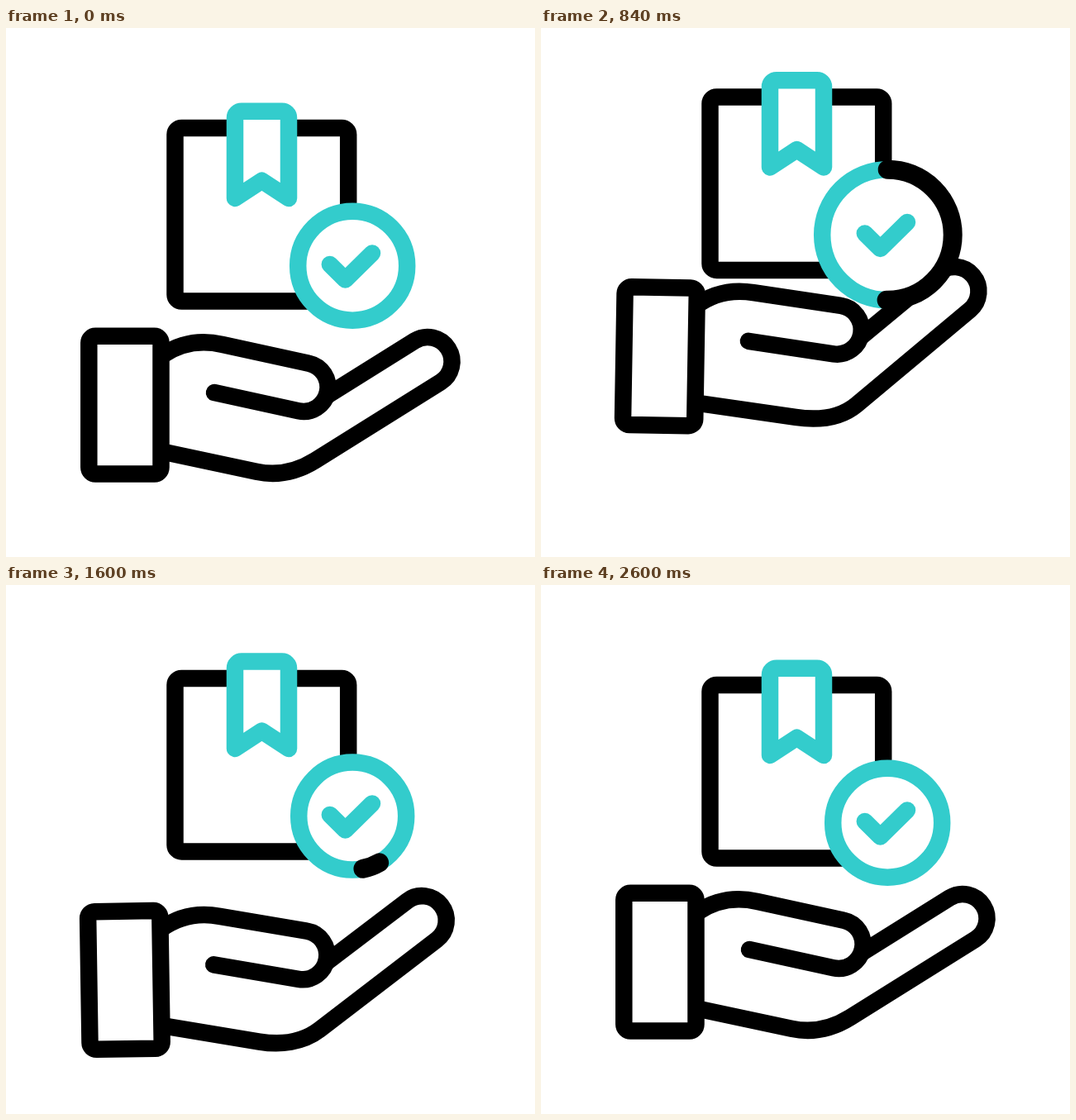
Recreate the animation shown at these times as an HTML page with a canvas. Size 640x640 px, loop 3000 ms.

```html
<!DOCTYPE html>
<html lang="en">
<head>
<meta charset="utf-8">
<title>Parcel in hand</title>
<style>
  html, body { margin: 0; width: 100%; height: 100%; overflow: hidden; background: #fff; }
  canvas { display: block; width: 640px; height: 640px; }
</style>
</head>
<body>
<canvas id="stage" width="640" height="640"></canvas>
<script>
const ctx = document.getElementById('stage').getContext('2d');
const LOOP = 3000, STEP = 40;
const BLACK = '#000', TEAL = '#33cccc', WHITE = '#fff';
const LINE = 20.5, RAD = Math.PI / 180;
const WRIST = [188, 456];
const BADGE = [419.2, 287.7];

const sine = u => (1 - Math.cos(Math.PI * u)) / 2;
const quadOut = u => 1 - (1 - u) ** 2;
const linear = u => u;

// Share of a change that has happened by time t; changes add up to a motion
function move(t, start, end, change, ease = sine) {
  const u = Math.min(1, Math.max(0, (t - start) / (end - start)));
  return change * ease(u);
}

// Dip, throw, wait, catch, settle
const handLift = t => move(t, 80, 400, 20) + move(t, 400, 900, -81) + move(t, 900, 1400, 31)
  + move(t, 1400, 1650, 56.5) + move(t, 1650, 2180, -26.5);
const palmBend = t => move(t, 80, 500, 6) + move(t, 500, 960, -11.6) + move(t, 1340, 1840, 5.6);
const cuffTilt = t => move(t, 80, 480, 2.9) + move(t, 480, 1280, -4.6) + move(t, 1300, 1920, 1.7);
const parcelDrop = t => move(t, 640, 1200, -64, quadOut) + move(t, 1340, 1790, 90)
  + move(t, 1790, 2440, -26);
const badgeRadius = t => 66 + move(t, 360, 840, 13) + move(t, 840, 1360, -25)
  + move(t, 1360, 1880, 25) + move(t, 1880, 2400, -13);
const arcHead = t => -90 + move(t, 640, 1640, 530, u => 1 - (1 - u) ** 1.87);
const arcTail = t => -90 + move(t, 987, 1624, 530, linear);

function turn(base, [x, y], degrees) {
  return base.translate(x, y).rotate(degrees).translate(-x, -y);
}

function stroke(color, width = LINE) {
  ctx.strokeStyle = color;
  ctx.lineWidth = width;
  ctx.stroke();
}

function frameRect(x, y, w, h) {
  ctx.beginPath();
  ctx.roundRect(x, y, w, h, 8);
  ctx.fill();
  stroke(BLACK);
}

function drawHand(t) {
  const bend = palmBend(t);
  const base = new DOMMatrix().translate(0, handLift(t));
  const palm = turn(base, WRIST, bend);
  const knuckle = bend > 0 ? [300, 425] : [420, 477];
  const fingers = turn(palm, knuckle, bend * 1.1);

  // Thumb
  ctx.setTransform(palm);
  ctx.beginPath();
  ctx.moveTo(190, 395.5);
  ctx.bezierCurveTo(213, 380, 238, 377.5, 262, 383);
  ctx.lineTo(366.3, 405.7);
  ctx.arc(360, 434.5, 29.5, -77.7 * RAD, 102.3 * RAD);
  ctx.lineTo(252, 441.1);
  stroke(BLACK);

  // Underside of the palm and the outstretched fingers
  ctx.beginPath();
  ctx.moveTo(188, 512.3);
  ctx.lineTo(303, 536.8);
  const heel = fingers.inverse().multiply(palm).transformPoint({ x: 328, y: 542.1 });
  ctx.setTransform(fingers);
  ctx.bezierCurveTo(heel.x, heel.y, 352, 537, 374, 523.3);
  ctx.lineTo(525.6, 428.5);
  ctx.arc(510, 403.5, 29.5, 58 * RAD, -122 * RAD, true);
  ctx.setTransform(palm);
  ctx.lineTo(388, 445);
  stroke(BLACK);

  ctx.setTransform(turn(base, WRIST, cuffTilt(t)));
  frameRect(100.3, 372.8, 87.2, 166.7);
}

function drawBadge(t) {
  const radius = badgeRadius(t);
  ctx.beginPath();
  ctx.arc(...BADGE, radius, 0, 2 * Math.PI);
  ctx.fill();
  stroke(TEAL);

  const tail = arcTail(t), head = arcHead(t);
  if (head - tail > 0.1) {
    ctx.beginPath();
    ctx.arc(...BADGE, radius, tail * RAD, head * RAD);
    stroke(BLACK, 23);
  }

  ctx.beginPath();
  ctx.moveTo(391.8, 286);
  ctx.lineTo(410.5, 304.5);
  ctx.lineTo(443, 272.5);
  stroke(TEAL);
}

function drawParcel(t) {
  ctx.setTransform(1, 0, 0, 1, 0, parcelDrop(t));
  frameRect(204.5, 121, 209.7, 209.5);

  // Ribbon
  ctx.beginPath();
  ctx.moveTo(277, 206);
  ctx.arcTo(277, 100.7, 300, 100.7, 8);
  ctx.arcTo(342, 100.7, 342, 206, 8);
  ctx.lineTo(342, 206);
  ctx.lineTo(309.5, 184.7);
  ctx.closePath();
  ctx.fill();
  stroke(TEAL);

  drawBadge(t);
}

function draw() {
  const t = Math.floor(performance.now() % LOOP / STEP) * STEP;
  ctx.setTransform(1, 0, 0, 1, 0, 0);
  ctx.fillStyle = WHITE;
  ctx.fillRect(0, 0, 640, 640);
  ctx.lineCap = ctx.lineJoin = 'round';
  drawHand(t);
  drawParcel(t);
  requestAnimationFrame(draw);
}
draw();
</script>
</body>
</html>
```
